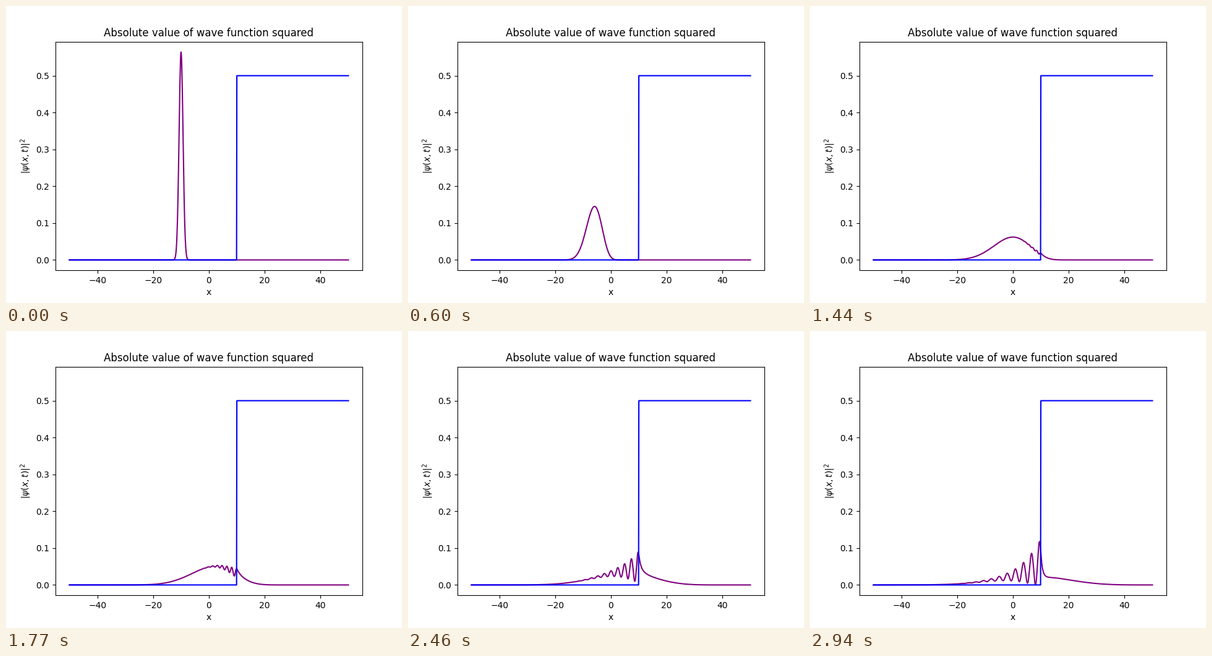
Write a matplotlib script that moves like this. It is 640 by 480 pixels and loops after 2.97 s.

```python
import numpy as np
import matplotlib.pyplot as plt
from matplotlib.animation import FuncAnimation

FRAMES, INTERVAL = 99, 30
DT = 0.2                 # time per frame
X0, K0 = -10, 1          # start of the packet and its wave number
WALL, V0 = 10, 1.0       # position and height of the step

# Hamiltonian on a coarse lattice, solved exactly through its eigenstates
grid = np.linspace(-50, 50, 301)
dx = grid[1] - grid[0]
step = 0.5 * V0 * (1 + np.sign(np.round(grid - WALL, 6)))
hop = np.full(grid.size - 1, -0.5 / dx**2)
H = np.diag(1 / dx**2 + step) + np.diag(hop, 1) + np.diag(hop, -1)
energy, modes = np.linalg.eigh(H)

psi0 = np.pi**-0.25 * np.exp(-(grid - X0)**2 / 2 + 1j * K0 * grid)
coeffs = modes.T @ psi0

# Band-limited interpolation onto the plotting grid
x = np.linspace(-50, 50, 1001)
basis = np.sinc((x[:, None] - grid) / dx) @ modes


def density(t):
    return np.abs(basis @ (coeffs * np.exp(-1j * energy * t)))**2


fig, ax = plt.subplots(figsize=(6.4, 4.8), dpi=100)
wave, = ax.plot(x, density(0), color="purple")
ax.plot(x, np.where(x > WALL - 0.05, 0.5, 0), color="blue")
ax.set_title("Absolute value of wave function squared")
ax.set_xlabel("x")
ax.set_ylabel(r"$|\psi(x,t)|^2$")


def update(i):
    wave.set_ydata(density(i * DT))
    return wave,


anim = FuncAnimation(fig, update, frames=FRAMES, interval=INTERVAL,
                     repeat=True, repeat_delay=0)
plt.show()
```
